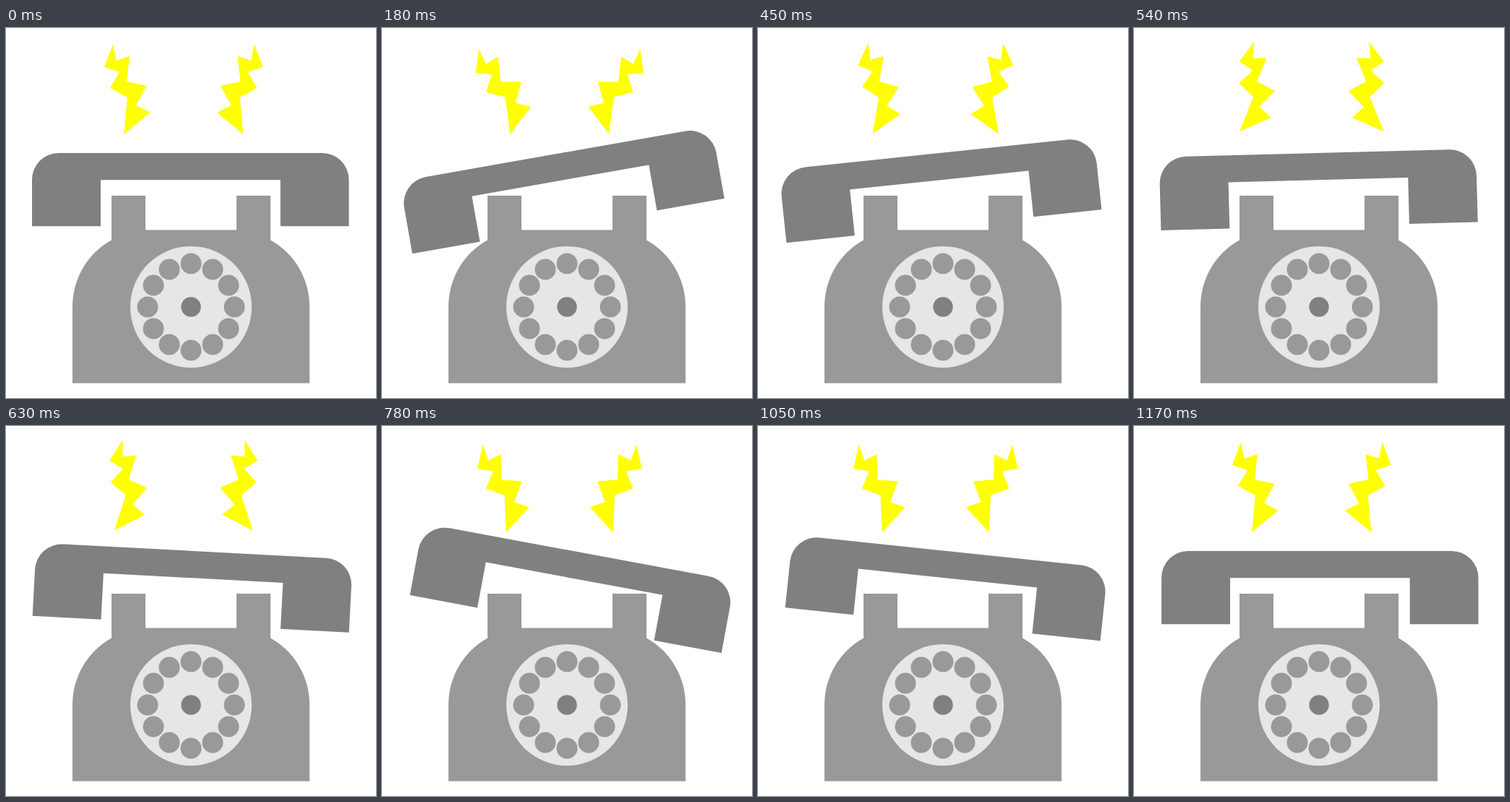
An HTML page for the animation above (1.2 s loop, 512x512 px).

```html
<!DOCTYPE html>
<html lang="en">
<head>
<meta charset="utf-8">
<title>Ringing telephone</title>
<style>
  html, body { margin: 0; height: 100%; overflow: hidden; background: #fff; }
  svg { display: block; width: 100vw; height: 100vh; }
</style>
</head>
<body>
<svg viewBox="0 0 512 512">
  <defs>
    <path id="bolt" fill="#ff0" d="M148 22.5 152.5 45 171 39 167 74 194.5 80 180 107 199.5 117 163 147 168 96 144 83 157 61 136 54Z"/>
  </defs>
  <use href="#bolt" class="bolt"/>
  <g transform="translate(491.5) scale(-1 1)"><use href="#bolt" class="bolt"/></g>
  <path fill="#999" d="M92 491.5V385A105 105 0 0 1 146 293.5V232H193V279.5H319V232H366V293.5A105 105 0 0 1 420 385V491.5Z"/>
  <circle cx="256" cy="386" r="84" fill="#e6e6e6"/>
  <g id="holes" fill="#999"></g>
  <circle cx="256" cy="386" r="13.7" fill="#808080"/>
  <path id="handset" fill="#808080" d="M36 274.3V210A37 37 0 0 1 73 173H437.5A37 37 0 0 1 474.5 210V274.3H379.7V210.3H131V274.3Z"/>
</svg>
<script>
  const STEP_MS = 30, STEPS = 40;
  const keySteps = [0, 9, 19, 29, 39];
  const handsetAngles = [0, -15, 0, 15, 0];
  const boltAngles = [0, -20, 20, -20, 0];

  const handset = document.getElementById('handset');
  const bolts = document.querySelectorAll('.bolt');

  document.getElementById('holes').innerHTML = Array.from({ length: 12 }, (_, i) => {
    const a = i * Math.PI / 6;
    return `<circle cx="${256 + 60 * Math.cos(a)}" cy="${386 + 60 * Math.sin(a)}" r="14.5"/>`;
  }).join('');

  // Linear interpolation between the key poses
  function pose(values, step) {
    const i = Math.max(1, keySteps.findIndex(k => k >= step));
    const from = keySteps[i - 1];
    const f = (step - from) / (keySteps[i] - from);
    return values[i - 1] + (values[i] - values[i - 1]) * f;
  }

  function draw(now) {
    const step = Math.floor(now / STEP_MS) % STEPS;
    const drift = 2 * step / (STEPS - 1);
    handset.setAttribute('transform',
      `translate(${drift}) rotate(${pose(handsetAngles, step)} 255.25 261)`);
    for (const bolt of bolts)
      bolt.setAttribute('transform', `rotate(${pose(boltAngles, step)} 168.7 85)`);
  }

  function tick() {
    draw(performance.now());
    requestAnimationFrame(tick);
  }
  tick();
</script>
</body>
</html>
```
